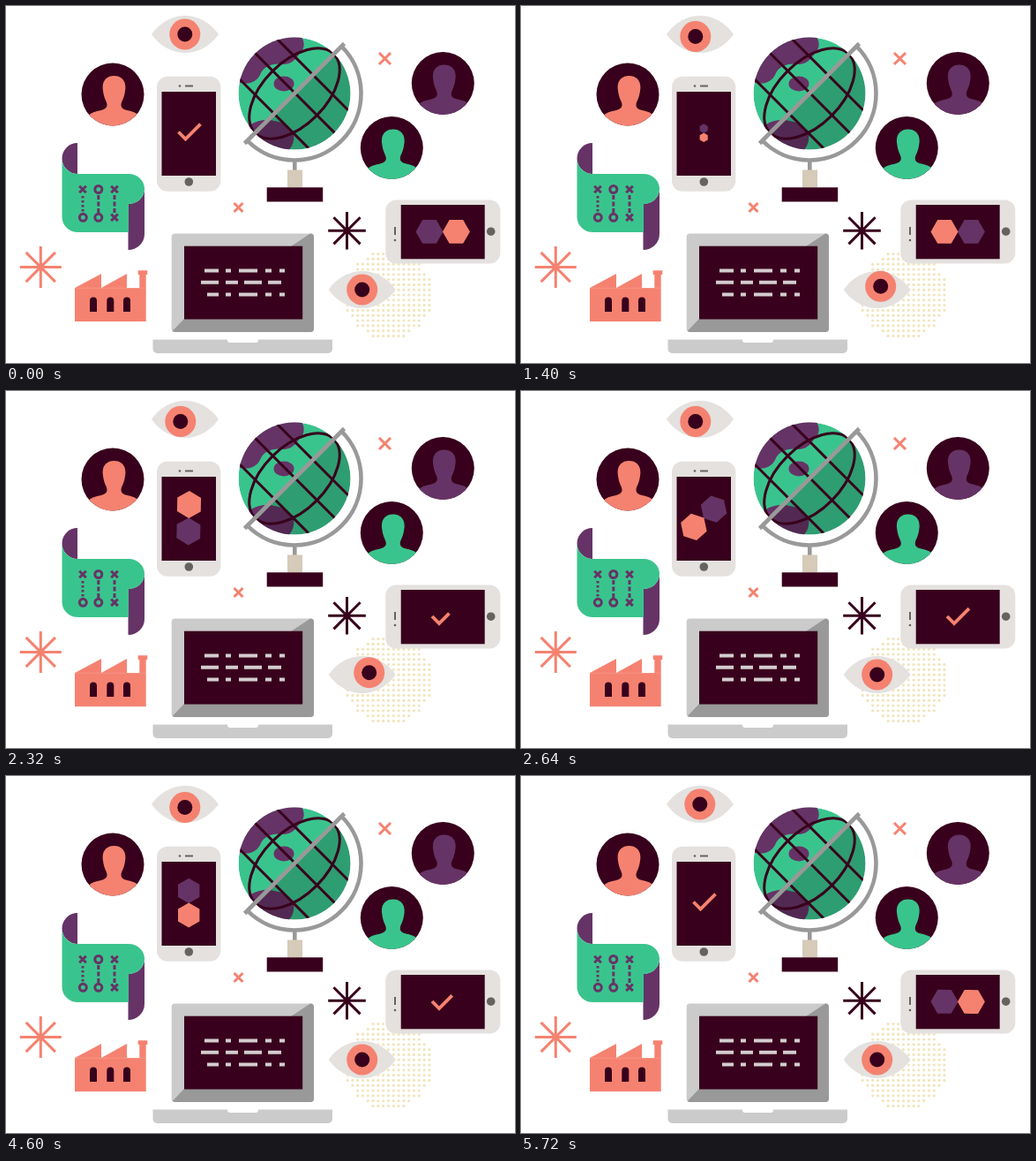
An HTML page for the animation above (5.76 s loop, 577 by 404 pixels).

```html
<!DOCTYPE html>
<html lang="en">
<head>
<meta charset="utf-8">
<title>Connected devices</title>
<style>
html, body { margin: 0; width: 100%; height: 100%; overflow: hidden; background: #fff; }
svg { display: block; width: 577px; height: 404px; }
.ink { fill: #38001c; }
.plum { fill: #663366; }
.coral { fill: #f58270; }
.mint { fill: #3ac48d; }
.pale { fill: #e4e1df; }
.knob { fill: #66625f; }
.line { fill: none; stroke-width: 3; }
.s-ink { stroke: #38001c; }
.s-plum { stroke: #663366; }
.s-coral { stroke: #f58270; }
.s-grey { stroke: #999; }
.s-knob { stroke: #66625f; stroke-width: 2; }
</style>
</head>
<body>
<svg viewBox="0 0 577 404" xmlns="http://www.w3.org/2000/svg">
  <defs>
    <clipPath id="face"><circle r="35.5"/></clipPath>
    <clipPath id="ball"><circle cx="327" cy="99" r="63.5"/></clipPath>
    <path id="bust" clip-path="url(#face)" d="M-27 24C-22 17-6.500 20-6.500 12C-6.500 8-10 5-11-4C-13-15-7-21 1.500-21C10-21 16-15 14-4C13 5 9.500 8 9.500 12C9.500 20 24 17 28 23V40H-27Z"/>
    <path id="lid" d="M-38 0C-18-28 18-28 38 0C18 28-18 28-38 0Z"/>
    <g id="iris"><circle class="coral" r="17.5"/><circle class="ink" r="8.500"/></g>
    <path id="cross" d="M-1-1L1 1M1-1L-1 1" vector-effect="non-scaling-stroke"/>
    <path id="star" d="M-1 0H1M0-1V1M-.707-.707L.707.707M.707-.707L-.707.707" vector-effect="non-scaling-stroke"/>
    <path id="hex" d="M0-15.500L13.400-7.750V7.750L0 15.500L-13.400 7.750V-7.750Z"/>
    <g id="pair"><use href="#hex" class="plum" y="-15.200"/><use href="#hex" class="coral" y="15.200"/></g>
    <path id="tick" d="M-12-.500L-4 7.500L13-9.300" pathLength="1" fill="none" stroke="#f58270" stroke-width="3.800"/>
  </defs>

  <g id="dots" fill="#f2e4bd"></g>

  <!-- people -->
  <g transform="translate(121 100)"><circle class="ink" r="35.500"/><use href="#bust" class="coral"/></g>
  <g transform="translate(495.300 87.500)"><circle class="ink" r="35.500"/><use href="#bust" class="plum"/></g>
  <g transform="translate(437.300 160.500)"><circle class="ink" r="35.500"/><use href="#bust" class="mint"/></g>

  <!-- globe -->
  <g clip-path="url(#ball)">
    <circle class="mint" cx="327" cy="99" r="63.500"/>
    <g class="plum">
      <path d="M262 86C275 90 284 86 288 78C292 67 304 64 315 66C328 65 330 56 336 50C340 42 336 36 332 30H300L262 60Z"/>
      <ellipse cx="315" cy="88" rx="11.500" ry="8.500"/>
      <path d="M270 140C282 128 296 128 304 130C316 131 318 138 326 143C327 152 326 158 318 166H280Z"/>
    </g>
    <path d="M271 155L383 43L440 100L340 200Z" fill="#000" fill-opacity=".2"/>
    <g class="line s-ink" stroke-width="3.500">
      <path d="M250 68L360 178M264 35L394 165M294 24L404 134"/>
      <ellipse cx="327" cy="99" rx="63" ry="35.500" transform="rotate(-45 327 99)"/>
    </g>
  </g>
  <path class="line s-grey" style="stroke-width:4.600" d="M270.500 155.500L383.500 42.500M380.400 45.600A75.500 75.500 0 0 1 273.600 152.400M327.300 175V187"/>
  <rect x="319" y="185.500" width="17" height="20" fill="#d6cab9"/>
  <rect class="ink" x="295.700" y="205.300" width="63.500" height="16.200"/>

  <!-- sparks -->
  <use href="#cross" class="line s-coral" transform="translate(429.500 59.500) scale(6.500)"/>
  <use href="#cross" class="line s-coral" transform="translate(263.500 228) scale(5)"/>
  <use href="#star" class="line s-coral" transform="translate(39.300 295.500) scale(23.500)"/>
  <use href="#star" class="line s-ink" transform="translate(386.500 254.300) scale(21.300)"/>

  <!-- scroll -->
  <path class="plum" d="M81 155A17.500 17.500 0 0 0 81 190ZM157 207V258A18.500 18 0 0 1 138.500 276V224A18 17 0 0 0 157 207Z"/>
  <path class="mint" d="M63.500 172.500A17.500 17.500 0 0 0 81 190H139A18 17 0 0 1 157 207A18 17 0 0 1 139 224V256H81A17.500 17.500 0 0 1 63.500 239Z"/>
  <g class="line s-plum">
    <use href="#cross" transform="translate(87 207.500) scale(3.800)"/>
    <use href="#cross" transform="translate(123 207.500) scale(3.800)"/>
    <use href="#cross" transform="translate(123 239.300) scale(3.800)"/>
    <circle cx="104.800" cy="207.500" r="4"/>
    <circle cx="87.300" cy="239.300" r="4"/>
    <circle cx="104.800" cy="239.300" r="4"/>
    <path d="M87 215V233" stroke-dasharray="2.500 2.500"/>
    <path d="M104.800 214V234M123 214V234" stroke-dasharray="5 2.500"/>
  </g>

  <!-- factory -->
  <path class="coral" d="M78 319L108 303V319L137 303V319H151.300V304H149.700V299.300H160.300V304H158.700V357H78Z"/>
  <path d="M78 319.200H158" stroke="#fff" stroke-opacity=".25" stroke-width=".6"/>
  <path class="ink" d="M95 346V333.500a4 4 0 0 1 8 0V346ZM114.300 346V333.500a4 4 0 0 1 8 0V346ZM133 346V333.500a4 4 0 0 1 8 0V346Z"/>

  <!-- laptop -->
  <rect x="187.700" y="257.500" width="161.300" height="111.500" rx="4" fill="#cbcbcb"/>
  <path d="M345 257.500A4 4 0 0 1 349 261.500V365A4 4 0 0 1 345 369H191.500L188.500 368L202 354L323 272Z" fill="#999"/>
  <rect class="ink" x="202" y="271.700" width="134.200" height="82.800"/>
  <path d="M225 299.500h16m8 0h6m9 0h21m9 0h7m9 0h6M221 312.800h20m8 0h14m7 0h20m7 0h15M228 326.500h13m8 0h6m9 0h21m9 0h7m9 0h6" fill="none" stroke="#d3cdcf" stroke-width="4"/>
  <path d="M166.500 377.500H251V378A3 3 0 0 0 254 381H283A3 3 0 0 0 286 378V377.500H370V388A5 5 0 0 1 365 393H171.500A5 5 0 0 1 166.500 388Z" fill="#cbcbcb"/>

  <!-- upright phone -->
  <rect class="pale" x="171" y="79.700" width="72.300" height="130" rx="12"/>
  <rect class="ink" x="176.500" y="97" width="61.500" height="95"/>
  <circle class="knob" cx="197" cy="90.500" r="1.300"/>
  <path class="s-knob" d="M203 90.500H212"/>
  <circle class="knob" cx="207.300" cy="199" r="4.800"/>
  <g transform="translate(207.200 143.700)"><use id="pairA" href="#pair"/></g>
  <g id="tickA" transform="translate(207.500 143)"></g>

  <!-- lying phone -->
  <rect class="pale" x="430.300" y="219.500" width="130" height="72" rx="12"/>
  <rect class="ink" x="447.700" y="225" width="95" height="61.300"/>
  <path class="s-knob" d="M441 250V259"/>
  <circle class="knob" cx="441" cy="265" r="1.300"/>
  <circle class="knob" cx="549.700" cy="255.200" r="4.800"/>
  <g transform="translate(495.200 255.400) rotate(90)"><use id="pairB" href="#pair"/></g>
  <g id="tickB" transform="translate(495 255.500)"></g>

  <!-- eyes -->
  <use href="#lid" class="pale" transform="translate(203 32)"/>
  <use id="eyeA" href="#iris"/>
  <use href="#lid" class="pale" transform="translate(403.700 321)"/>
  <use id="eyeB" href="#iris"/>
</svg>
<script>
const LOOP = 5760;
const $ = id => document.getElementById(id);

// halftone disc
const dots = $('dots'), STEP = 5.8;
for (let i = -8; i <= 8; i++) {
  for (let j = -8; j <= 8; j++) {
    if (Math.hypot(i, j) > 8.6) continue;
    const dot = document.createElementNS('http://www.w3.org/2000/svg', 'circle');
    dot.setAttribute('cx', 433.5 + i * STEP);
    dot.setAttribute('cy', 327 + j * STEP);
    dot.setAttribute('r', 1.6);
    dots.append(dot);
  }
}

const ticks = ['tickA', 'tickB'].map(id => {
  const tick = $('tick').cloneNode();
  tick.removeAttribute('id');
  $(id).append(tick);
  return tick;
});

// cubic-bezier(.4, 0, .2, 1)
function ease(x) {
  let lo = 0, hi = 1, u = 0.5;
  for (let i = 0; i < 24; i++) {
    u = (lo + hi) / 2;
    const v = 1 - u;
    if (1.2 * u * v * v + 0.6 * u * u * v + u * u * u < x) lo = u; else hi = u;
  }
  return u * u * (3 - 2 * u);
}

// eased value between [time, value] keys
function tween(keys, t) {
  const n = keys.findIndex(k => k[0] > t);
  if (n < 0) return keys[keys.length - 1][1];
  if (n === 0) return keys[0][1];
  const [t0, a] = keys[n - 1], [t1, b] = keys[n];
  return a === b ? a : a + (b - a) * ease((t - t0) / (t1 - t0));
}

// last key reached, no blending
const hold = (keys, t) => keys.filter(k => k[0] <= t).pop();

const screens = [
  {
    pair: $('pairA'), tick: ticks[0],
    spin: [[2000, 0], [2360, -180], [2960, -360]],
    size: [[1230, 0], [1820, 1], [4560, 1], [4800, 0]],
    draw: [[880, 1], [1240, 0], [4760, 0], [5160, 1]]
  },
  {
    pair: $('pairB'), tick: ticks[1],
    spin: [[0, -180], [600, -360], [5160, -360], [5760, -540]],
    size: [[1400, 1], [2000, 0], [4760, 0], [5160, 1]],
    draw: [[2020, 0], [2620, 1], [4560, 1], [4800, 0]]
  }
];

const eyes = [
  { el: $('eyeA'), look: [[0, 202.8, 32], [840, 197.8, 34.5], [3120, 202.8, 35.5], [5400, 202.8, 32]] },
  { el: $('eyeB'), look: [[0, 403.7, 321], [400, 407.7, 317.3], [1440, 411.7, 318.7], [2480, 403.7, 321]] }
];

function render(t) {
  for (const s of screens) {
    const size = tween(s.size, t), len = tween(s.draw, t);
    s.pair.setAttribute('transform', `rotate(${tween(s.spin, t)}) scale(${size})`);
    s.pair.style.visibility = size > 0.001 ? 'visible' : 'hidden';
    s.tick.setAttribute('stroke-dasharray', `${len} 2`);
    s.tick.style.visibility = len > 0.001 ? 'visible' : 'hidden';
  }
  for (const { el, look } of eyes) {
    const [, x, y] = hold(look, t);
    el.setAttribute('transform', `translate(${x} ${y})`);
  }
}

const start = performance.now();
function tickFrame() {
  render((performance.now() - start) % LOOP);
  requestAnimationFrame(tickFrame);
}
tickFrame();
</script>
</body>
</html>
```
